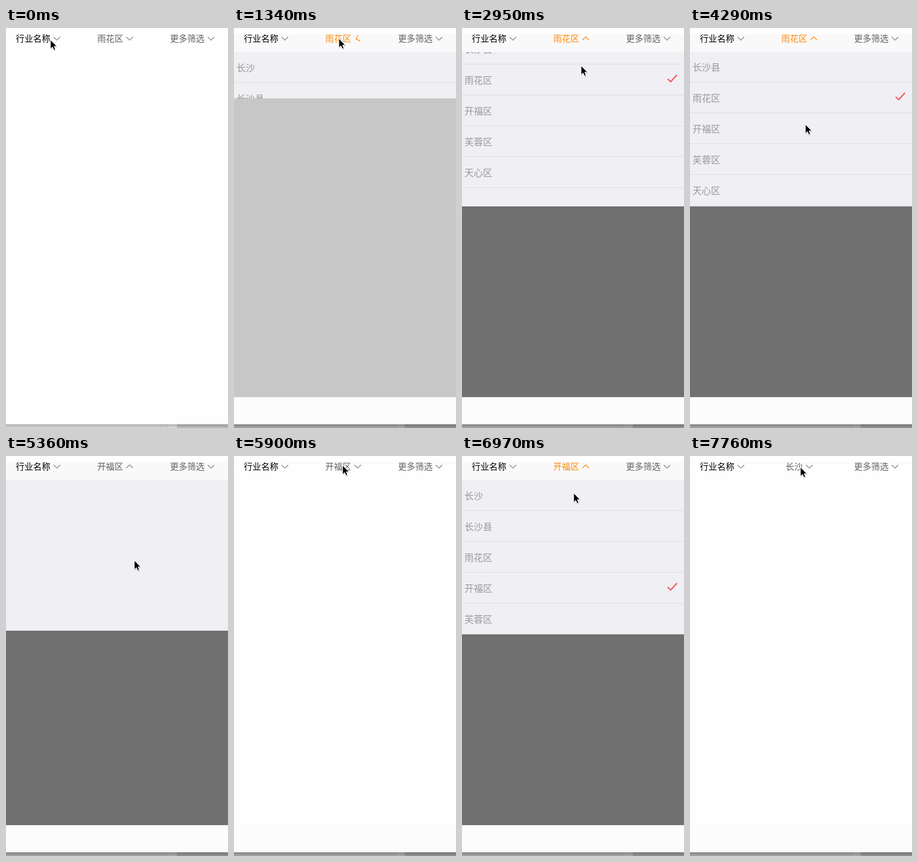
Write an HTML page that moves like this. It is 360 by 648 pixels and loops after 8000 ms.

```html
<!DOCTYPE html>
<html lang="zh-CN">
<head>
<meta charset="utf-8">
<style>
html, body { margin: 0; width: 100%; height: 100%; overflow: hidden; background: #fefefe; }
svg { display: block; font-family: "Noto Sans CJK SC", "Noto Sans CJK", sans-serif; }
.caret { fill: none; stroke: #8a8a8a; stroke-width: 1.2; }
.tab { font-size: 14px; fill: #606060; }
.row { font-size: 15px; fill: #999; }
</style>
</head>
<body>
<svg width="360" height="648" viewBox="0 0 360 648">
  <defs>
    <clipPath id="clip"><rect id="clipBox" y="39" width="360" height="0"/></clipPath>
    <linearGradient id="fade" x2="0" y2="1">
      <stop stop-opacity=".2"/><stop offset="1" stop-opacity="0"/>
    </linearGradient>
  </defs>
  <rect width="360" height="648" fill="#fefefe"/>
  <rect id="bar" y="10" width="360" height="29"/>
  <rect id="edge" y="11" width="360" height="1" fill="#f6f6f6"/>
  <rect id="foot" y="598" width="360" height="44" fill="#fcfcfc"/>
  <rect id="mask" y="39" width="360" height="559"/>
  <g clip-path="url(#clip)">
    <rect y="39" width="360" height="250" fill="#efeff4"/>
    <g id="list"></g>
  </g>
  <g id="tabs"></g>
  <rect y="642" width="360" height="6" fill="#d6d6d6"/>
  <path d="M262 642h15v6h-15z" fill="#dcdcdc"/>
  <path d="M262.5 642v6" stroke="#c4c4c4"/>
  <path d="M277 642h83v6h-83z" fill="#bdbdbd"/>
  <rect y="642" width="360" height="6" fill="url(#fade)"/>
  <rect id="shade" y="642" width="360" height="6" opacity=".23"/>
  <g id="cursor">
    <path d="M0 0V15L3.4 11.8 5.6 16.8 8.2 15.7 6.1 10.8H10.6Z" fill="#000" opacity=".22" transform="translate(.6 1.6)"/>
    <path d="M0 0V15L3.4 11.8 5.6 16.8 8.2 15.7 6.1 10.8H10.6Z" stroke="#fff"/>
  </g>
</svg>
<script>
const $ = id => document.getElementById(id);
const set = (el, attrs) => { for (const k in attrs) el.setAttribute(k, attrs[k]); };
const add = (parent, tag, attrs, text = '') => {
  const el = document.createElementNS('http://www.w3.org/2000/svg', tag);
  set(el, attrs);
  el.textContent = text;
  return parent.appendChild(el);
};

// A label and its chevron, centred together
function makeTab(center) {
  const label = add($('tabs'), 'text', { class: 'tab', y: 22 });
  const caret = add($('tabs'), 'path', { class: 'caret', d: 'M-5.3-2.5 0 2.6 5.3-2.5' });
  return (text, color, stroke, turn = 0) => {
    const half = (text.length * 14 + 16) / 2;
    label.textContent = text;
    set(label, { x: center - half, style: `fill:${color}` });
    set(caret, { transform: `translate(${center + half - 5.5} 17) rotate(${turn})`, style: `stroke:${stroke}` });
  };
}
const [industry, district, more] = [52, 177, 302].map(makeTab);
industry('行业名称', '#000', '#8a8a8a');
more('更多筛选', '#606060', '#8a8a8a');

const rows = ['长沙', '长沙县', '雨花区', '开福区', '芙蓉区', '天心区'];
const marks = rows.map((name, i) => {
  const y = 39 + i * 50;
  add($('list'), 'text', { class: 'row', x: 4, y: y + 30.5 }, name);
  add($('list'), 'rect', { y: y + 49, width: 360, height: 1, fill: '#dedee3' });
  return add($('list'), 'path', {
    d: `M333.5 ${y + 23.5}l5 4.5 10-11`, fill: 'none', stroke: '#f2595f', 'stroke-width': 2
  });
});

// Each step holds until the next and keeps whatever it does not change.
// at: cursor, h: panel bottom, dim: overlay, turn: chevron, s: scroll
const open1 = { h: 114, dim: .215, turn: 70, on: 1, lit: 1, used: 1 };
const open2 = { h: 271, dim: .55, turn: 180 };
const closing = { h: 283, on: 0, lit: 0 };
const closed = { h: 39, dim: 0, turn: 0, s: 0 };
const changes = [
  [0, { at: [72, 19], name: '雨花区', pick: 2, ...closed, on: 0, lit: 0, used: 0 }],
  [270, { at: [97, 19] }],
  [540, { at: [164, 22] }],
  [810, { at: [170, 17] }],
  [1340, open1],
  [1610, open2],
  [1880, { h: 289, dim: .556, at: [171, 18] }],
  [2420, { s: 50, at: [181, 140] }],
  [2680, { s: 51, at: [191, 112] }],
  [2950, { s: 80, at: [193, 61] }],
  [3220, { s: 54 }],
  [3490, { s: 51, at: [190, 120] }],
  [3750, { s: 50, at: [188, 180] }],
  [4020, { s: 58, at: [187, 148] }],
  [4290, { s: 51, at: [187, 156] }],
  [4560, { s: 50, at: [206, 183] }],
  [4830, { at: [208, 169] }],
  [5360, { ...closing, name: '开福区', pick: 3 }],
  [5630, closed],
  [5900, { at: [176, 15] }],
  [6160, { at: [177, 19] }],
  [6430, open1],
  [6700, open2],
  [6970, { h: 289, dim: .556, at: [181, 60] }],
  [7230, { ...closing, name: '长沙', pick: 0 }],
  [7500, { ...closed, at: [180, 36] }],
  [7760, { at: [179, 18] }]
];
let last = {};
const steps = changes.map(([t, change]) => ({ t, state: last = { ...last, ...change } }));

function draw(p) {
  const opened = p.h > 39;
  district(p.name, p.lit ? '#ff8a0c' : '#606060', p.lit ? '#ff8a0c' : '#8a8a8a', p.turn);
  set($('bar'), { fill: opened ? '#f9f9f9' : '#fefefe' });
  set($('edge'), { opacity: p.used && !opened ? 1 : 0 });
  set($('foot'), { opacity: p.used });
  set($('shade'), { opacity: p.used * .23 });
  set($('mask'), { opacity: p.dim });
  set($('clipBox'), { height: p.h - 39 });
  set($('list'), { opacity: p.on, transform: `translate(0 ${-p.s})` });
  marks.forEach((m, i) => set(m, { opacity: +(i === p.pick) }));
  set($('cursor'), { transform: `translate(${p.at})` });
}

const start = performance.now();
let shown;
function tick() {
  const t = (performance.now() - start) % 8000;
  const step = steps.filter(s => s.t <= t).pop();
  if (step !== shown) draw((shown = step).state);
  requestAnimationFrame(tick);
}
tick();
</script>
</body>
</html>
```
